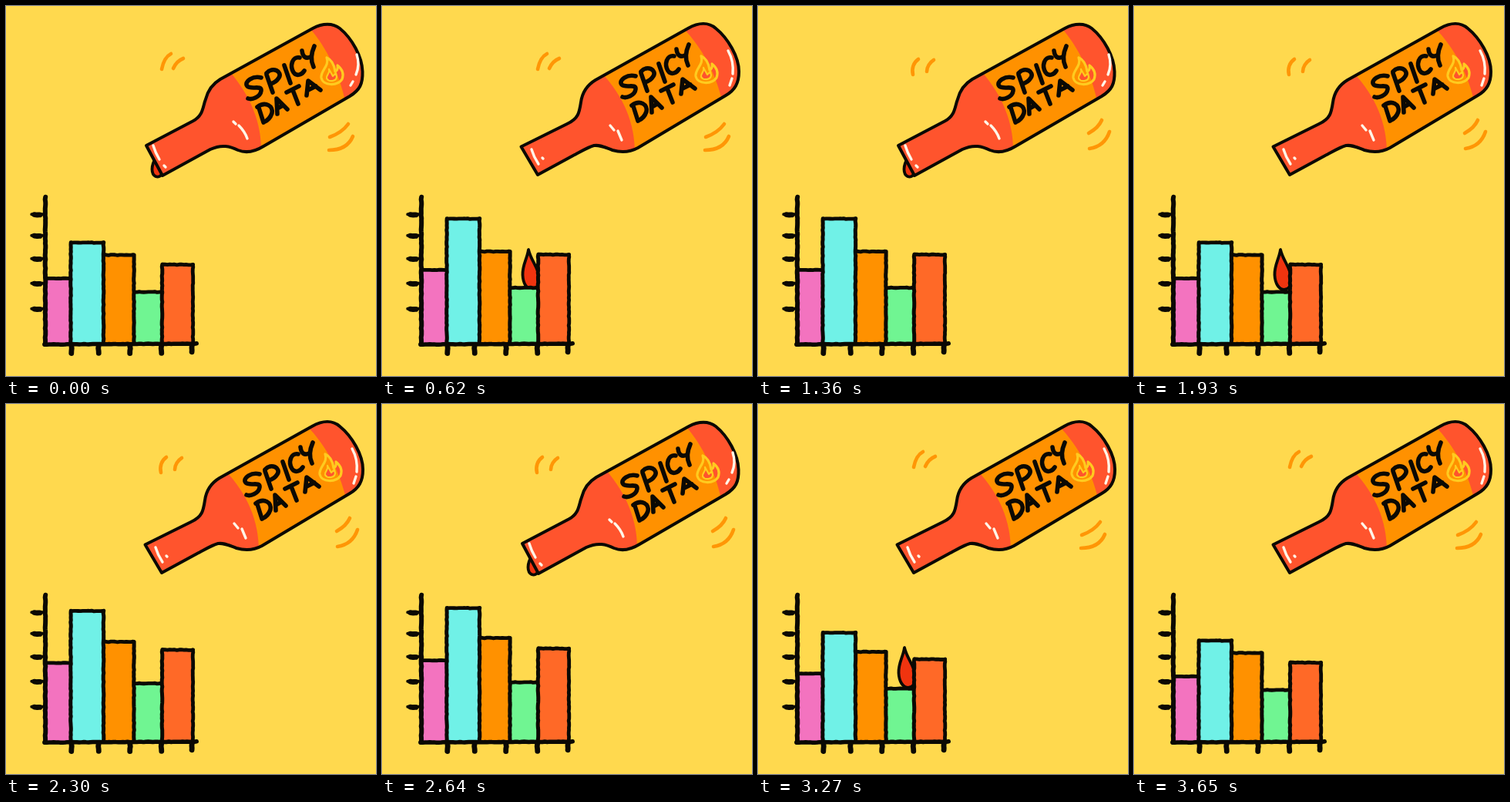
Animation, 480 px wide and 480 px high, one loop 3.82 s. Source, as an HTML page with a canvas:

```html
<!DOCTYPE html>
<html lang="en">
<head>
<meta charset="utf-8">
<title>Spicy data</title>
<style>
html, body { margin: 0; width: 100%; height: 100%; overflow: hidden; background: #ffd94e; }
canvas { display: block; width: 480px; height: 480px; }
</style>
</head>
<body>
<canvas id="stage" width="480" height="480"></canvas>
<script>
const ctx = document.getElementById('stage').getContext('2d');
const LOOP = 3820;
const INK = '#0b0904', PAPER = '#ffd94e', RED = '#ff542d', ORANGE = '#ff9100', YELLOW = '#ffcb1f', WHITE = '#fff6e8';

function shape(d, fill, line, width = 4) {
  const path = new Path2D(d);
  if (fill) { ctx.fillStyle = fill; ctx.fill(path); }
  if (line) { ctx.strokeStyle = line; ctx.lineWidth = width; ctx.stroke(path); }
}
const stroke = (d, color, width) => shape(d, null, color, width);

// Slightly grainy crayon line between two points.
function rough(x0, y0, x1, y1, width) {
  const steps = Math.max(2, Math.round(Math.hypot(x1 - x0, y1 - y0) / 3));
  const noise = n => Math.sin(n * n * 2.3 + n * 1.7 + x0) * 0.3;
  ctx.beginPath();
  for (let i = 0; i <= steps; i++) {
    const k = i / steps;
    ctx.lineTo(x0 + (x1 - x0) * k + noise(i), y0 + (y1 - y0) * k + noise(i + 40));
  }
  ctx.strokeStyle = INK;
  ctx.lineWidth = width;
  ctx.stroke();
}

// Time to drawing index; the pace eases off slightly after the middle.
function drawingAt(t) {
  return Math.floor((t < 2300 ? t / 41.07 : 56 + (t - 2300) / 42.22) + 0.06);
}

// Chart: tops at three key levels, from low to high.
const bars = [
  { x0: 53, x1: 83, color: '#f373bf', tops: [353.5, 342.5, 336] },
  { x0: 85, x1: 126, color: '#70f1e7', tops: [307, 276, 268.5] },
  { x0: 127, x1: 165, color: ORANGE, tops: [323, 318.5, 308.5] },
  { x0: 167, x1: 202, color: '#70f592', tops: [371, 365.5, 362.5] },
  { x0: 203, x1: 243, color: '#ff6927', tops: [335.5, 322.5, 319] }
];
const levels = [
  [0, 0], [9, .33], [12, .67], [15, 1], [18, 2.5], [30, 2], [33, 1], [36, .67], [39, .33], [42, 0],
  [48, .5], [51, 1], [54, 2], [59, 2.25], [60, 2.5], [69, 2], [72, 1], [75, .67], [78, .33], [81, .15], [84, 0]
];

function topOf(bar, level) {
  const i = Math.min(1, Math.floor(level));
  return bar.tops[i] + (bar.tops[i + 1] - bar.tops[i]) * (level - i);
}

function drawChart(n) {
  const level = levels.filter(key => key[0] <= n).pop()[1];
  const tops = bars.map(bar => topOf(bar, level));
  bars.forEach((bar, i) => {
    ctx.fillStyle = bar.color;
    ctx.fillRect(bar.x0, tops[i], bar.x1 - bar.x0, 438 - tops[i]);
  });
  bars.forEach((bar, i) => {
    rough(bar.x0, tops[i], bar.x1, tops[i], 4.8);
    if (i < 4) {
      const x = (bar.x1 + bars[i + 1].x0) / 2;
      rough(x, Math.min(tops[i], tops[i + 1]), x, 438, 5);
    }
  });
  rough(242.5, tops[4], 242.5, 438, 4.8);
  rough(51, 248, 51, 439, 6);
  rough(50, 439, 247, 438, 5.5);
  for (const y of [270.5, 298, 328, 360, 393]) {
    rough(33, y, 48, y, 4);
    rough(37, y, 44, y + .5, 6.8);
  }
  for (const x of [85, 120, 161, 201.5, 241]) rough(x, 441, x, x > 240 ? 449 : 450.5, 6.8);
}

// Drip grows at the mouth, lets go and drops behind the bars.
function drawDrip(step) {
  const fill = '#f0340f';
  if (step < 5) {
    shape('M194 198 C188 207 188 218 194 221 C199 223 203 219 203 215', fill, INK, 3.8);
  } else if (step < 8) {
    shape('M195 207 C194 219 184 227 185 237 C187 247 200 247 201 236 C201 228 199 222 201 214', fill, INK, 3.4);
  } else if (step < 11) {
    shape('M194 210 C197 225 181 239 181.500 252 C182 268 199 268 200 254 C200 241 196 232 199 218', fill, INK, 3.4);
  } else if (step < 17) {
    const top = step < 13 ? 228 : [252, 283, 315, 345][step - 13];
    ctx.save();
    ctx.translate(190, top);
    shape('M0 1 C-2 14 -8 21 -7.500 34 C-7 45 -2 53 5 53 C12 52 15 46 14 38 C13 24 3 15 0 1Z', fill, INK, 3.8);
    ctx.restore();
  }
}

const letters = [
  'M330 92 C320 89 307 97 312 103 C317 108 331 101 330 109 C329 117 318 121 313 119',
  'M337 88 L345 111 M337 86 C345 77 358 84 353 92 C350 97 346 99 342 100',
  'M360 76 L368 99',
  'M380 66 C370 64 367 77 372 85 C376 91 383 88 386 83',
  'M383 57 C384 65 388 68 394 65 M399 51 C395 60 394 70 398 78',
  'M327 131 L333 150 M325 130 C336 122 346 129 344 138 C342 144 338 148 333 150',
  'M351 139 L350 119 L364 133 M351 132 L358 128',
  'M363 111 L379 103 M371 108 L378 126',
  'M389 115 L391 96 L407 108 M391 108 L401 103'
];

const poses = [
  {
    body: 'M182 181 L243 149 C256 142 255 131 259 121 C262 109 268 101 278 95 L398 29 C411 22 424 22 433 29 C449 42 462 66 462.500 85 C463 101 459 109 446 117 L334 182 C321 190 311 191 301 187 C291 182 280 179 265 186 L203 220 Z',
    label: 'M290 85 L390 24 C411 47 432 82 441 128 L331 190 C332 153 318 117 290 85Z',
    text: [1, 1],
    shine: ['M191 181 C193 188 196 194 199 199', 'M205 207 L207 209', 'M295 150 L298 153', 'M302 155 C307 160 311 166 313 172',
      'M455 63 C458 72 457 82 454 89', 'M450 98 L447 103']
  },
  {
    body: 'M180.500 182.500 L240 153 C255 146 256 138 258 125 C260 110 267 102 277 96 L397 29 C411 21 424 21 433 29 C449 42 463 66 463 85 C463 100 458 109 446 116 L332 184 C321 190 309 190 299 187 C288 183 283 180 275 181 C267 183 256 190 248 194 L202 219 Z',
    label: 'M284 86 L386 24 C411 48 432 82 442 126 L328 190 C328 153 314 117 284 86Z',
    text: [-1, -1],
    shine: ['M194 186 C196 193 199 199 203 205', 'M208 197 L209 198', 'M296 155 L301 161', 'M306 162 L311 174',
      'M449 58 C454 67 456 78 455 88', 'M454 94 L451 103']
  }
];

function drawFlame() {
  shape('M415 66 C419 77 407 82 408 92 C410 103 429 103 435 94 C438 86 434 80 429 76 C430 81 428 83 426 84 C425 76 422 69 415 66Z', null, YELLOW, 3.2);
  shape('M418 81 C420 86 414 88 415 93 C418 98 427 97 428 91 L427 86 L423 90 Z', RED, YELLOW, 2.2);
}

function drawBottle(pose) {
  shape(pose.body, RED);
  ctx.save();
  ctx.clip(new Path2D(pose.body));
  shape(pose.label, ORANGE);
  ctx.restore();
  stroke(pose.body, INK, 4);
  ctx.save();
  ctx.translate(...pose.text);
  letters.forEach(d => stroke(d, INK, 5.6));
  drawFlame();
  ctx.restore();
  pose.shine.forEach(d => stroke(d, WHITE, 3.4));
}

const marks = [
  ['M202 82 C204 72 208 65 214 62', 'M217 81 C220 74 225 70 230 68', 'M420 170 C431 166 439 160 444 153', 'M419 187 C435 187 445 181 450 169'],
  ['M201 89 C199 81 202 73 208 69', 'M219 85 C219 79 223 73 228 70', 'M429 165 C438 160 443 155 446 148', 'M430 185 C443 183 452 175 456 163']
];

function draw(t) {
  const n = drawingAt(t);
  ctx.fillStyle = PAPER;
  ctx.fillRect(0, 0, 480, 480);
  marks[n >= 20 && n < 66 ? 1 : 0].forEach(d => stroke(d, '#ff9606', 4.6));
  drawDrip(n % 32);
  drawChart(n);
  drawBottle(poses[Math.floor(n / 8) % 2]);
}

ctx.lineCap = ctx.lineJoin = 'round';
const start = performance.now();
function tick() {
  draw((performance.now() - start) % LOOP);
  requestAnimationFrame(tick);
}
tick();
</script>
</body>
</html>
```
